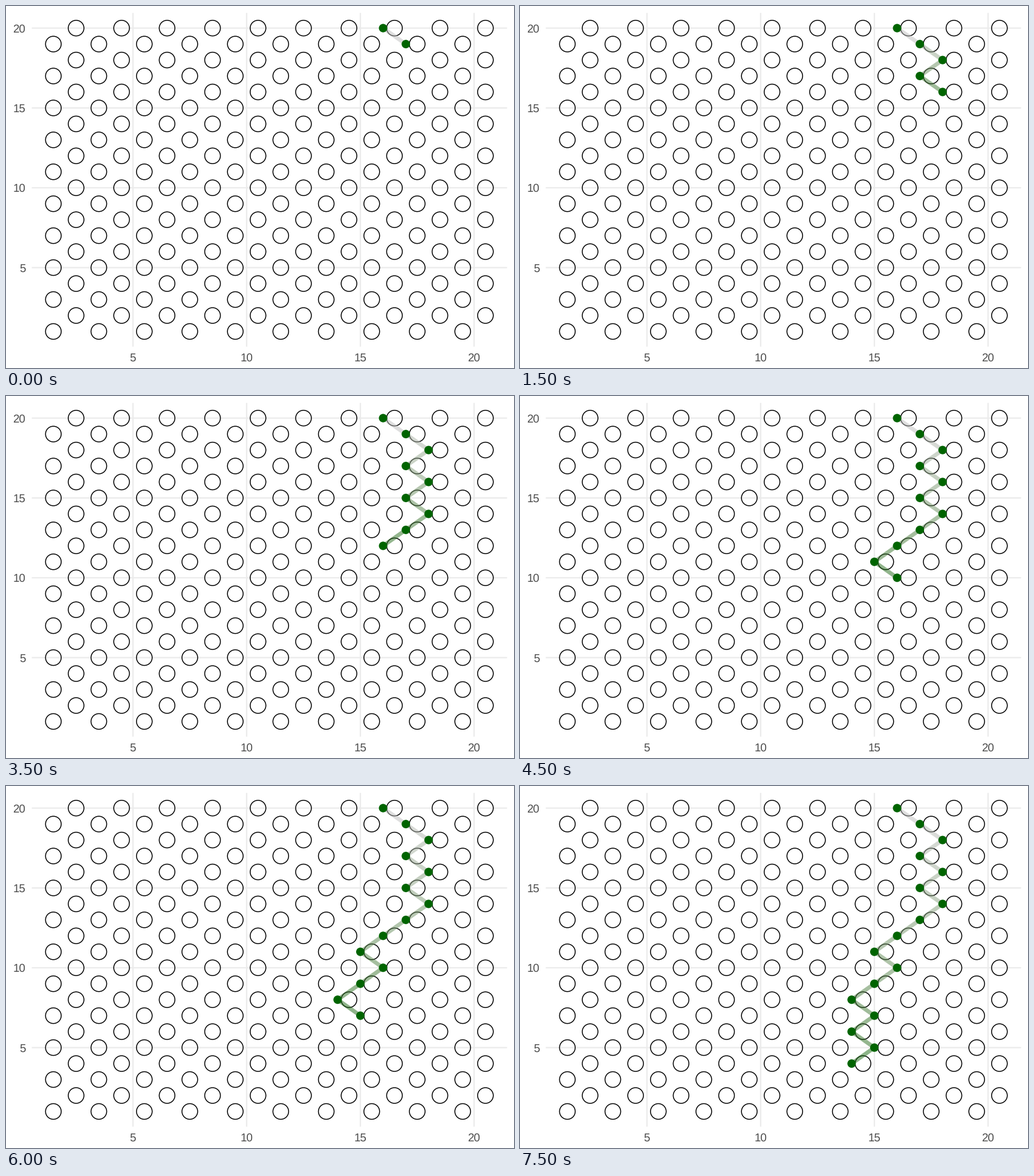
Write a matplotlib script that moves like this. It is 840x600 px and loops after 8000 ms.

```python
import numpy as np
import matplotlib.pyplot as plt
from matplotlib.animation import FuncAnimation
from matplotlib.collections import LineCollection, PatchCollection
from matplotlib.patches import Circle

W, H, DPI = 840, 600, 100
PT = 72 / DPI  # points per pixel
LEFT, RIGHT, TOP, BOTTOM = 42.6, 828.5, 11.5, 564.6
GREY, GREEN = "#bebebe", "#006400"
STEP_MS = 500

plt.rcParams["font.family"] = "Liberation Sans"
plt.rcParams["path.snap"] = False
plt.rcParams["text.hinting"] = "none"


def px(x):
    return LEFT + (x - 0.55) * (RIGHT - LEFT) / 20.9


def py(y):
    return BOTTOM - (y - 0.05) * (BOTTOM - TOP) / 20.9


# Colours are blended in CIE Lab.
TO_XYZ = np.array([[0.4124, 0.3576, 0.1805],
                   [0.2126, 0.7152, 0.0722],
                   [0.0193, 0.1192, 0.9505]])
WHITE = TO_XYZ.sum(axis=1)
TO_LAB = np.array([[0, 116, 0], [500, -500, 0], [0, 200, -200]])


def to_lab(color):
    rgb = np.array(plt.matplotlib.colors.to_rgb(color))
    lin = np.where(rgb > 0.04045, ((rgb + 0.055) / 1.055) ** 2.4, rgb / 12.92)
    t = TO_XYZ @ lin / WHITE
    f = np.where(t > 0.008856, np.cbrt(t), 7.787 * t + 16 / 116)
    return TO_LAB @ f - [16, 0, 0]


def to_rgb(lab):
    fy = (lab[0] + 16) / 116
    f = np.array([fy + lab[1] / 500, fy, fy - lab[2] / 200])
    t = np.where(f > 0.2069, f ** 3, (f - 16 / 116) / 7.787)
    lin = np.clip(np.linalg.solve(TO_XYZ, t * WHITE), 0, 1)
    rgb = np.where(lin > 0.0031308, 1.055 * lin ** (1 / 2.4) - 0.055, 12.92 * lin)
    return np.clip(rgb, 0, 1)


LOW, HIGH = to_lab(GREY), to_lab(GREEN)


def fade(t):
    return (*to_rgb(LOW + t * (HIGH - LOW)), 0.5)


fig = plt.figure(figsize=(W / DPI, H / DPI), dpi=DPI, facecolor="white")
ax = fig.add_axes([0, 0, 1, 1])
ax.set(xlim=(0, W), ylim=(H, 0))
ax.axis("off")

# Grid and axis labels
label = dict(color="#4d4d4d", fontsize=18.75 * PT, va="baseline")
grid = dict(color="#ebebeb", lw=2.2 * PT, solid_capstyle="butt", zorder=1)
for v in (5, 10, 15, 20):
    ax.plot([px(v)] * 2, [TOP, BOTTOM], **grid)
    ax.text(px(v), 588.5, str(v), ha="center", **label)
    if v < 21:
        ax.plot([LEFT, RIGHT], [py(v)] * 2, **grid)
        ax.text(32.3, py(v) + 6.8, str(v), ha="right", **label)

# Staggered pegs
pegs = [Circle((px(x + 0.5), py(y)), 12.96)
        for y in range(1, 21) for x in range(2 - y % 2, 21, 2)]
ax.add_collection(PatchCollection(pegs, facecolor="none", edgecolor="black",
                                  linewidth=1.48 * PT, zorder=2))

# The ball drops one row per step, moving left or right.
moves = [1, 1, -1, 1, -1, 1, -1, -1, -1, 1, -1, -1, 1, -1, 1, -1]
xs = 16 + np.cumsum([0] + moves)
ys = 20 - np.arange(len(xs))
path = np.column_stack([px(xs), py(ys)])
segments = np.stack([path[:-1], path[1:]], axis=1)

trail = LineCollection([], linewidths=6.67 * PT, capstyle="butt", zorder=3)
ax.add_collection(trail)
balls = [ax.add_patch(Circle(p, 7.0, facecolor=GREEN, edgecolor="none", zorder=4))
         for p in path]


def update(i):
    n = i + 1
    trail.set_segments(segments[:n])
    trail.set_color([fade(k / n) for k in range(n)])
    for k, ball in enumerate(balls):
        ball.set_visible(k <= n)
    return [trail, *balls]


anim = FuncAnimation(fig, update, frames=len(moves), interval=STEP_MS,
                     repeat=True, repeat_delay=0, blit=False)
plt.show()
```
